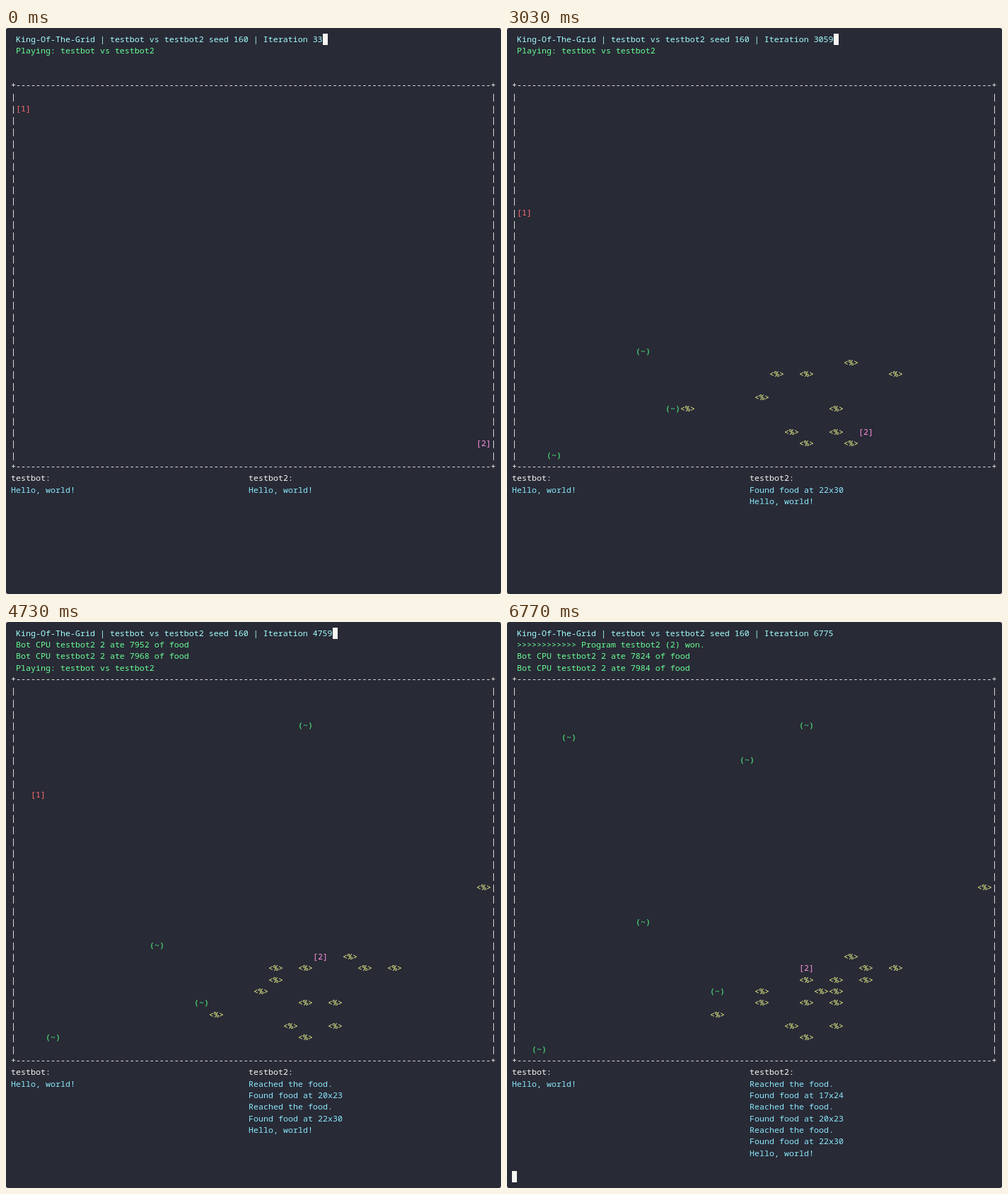
Animation of 700x800 px, one loop 9770 ms. Source, as an HTML page:

```html
<!DOCTYPE html>
<html lang="en">
<head>
<meta charset="utf-8">
<title>Grid battle</title>
<style>
  html, body { margin: 0; width: 100%; height: 100%; overflow: hidden; background: #fff; }
  #term {
    position: relative; width: 700px; height: 800px; overflow: hidden;
    background: #282a36; border-radius: 3px;
    font: 11.6667px/16.3333px "Noto Sans Mono", "DejaVu Sans Mono", monospace;
    font-variant-ligatures: none; font-kerning: none;
  }
  #term span { position: absolute; white-space: pre; }
  #cursor { position: absolute; width: 7px; height: 16px; background: #f8f8f2; }
</style>
</head>
<body>
<div id="term"><div id="frame"></div><div id="live"></div><div id="cursor"></div></div>
<script>
const LOOP = 9770, LAST = 199, CW = 7, LH = 49 / 3;
const C = {
  white: '#f8f8f2', title: '#a4ffff', log: '#69ff94', say: '#8be9fd',
  food: '#f1fa8c', plant: '#50fa7b', bot1: '#ff6e6e', bot2: '#ff92df'
};

// Food in order of growth; one piece sprouts every 8.3 ticks.
const foods = [
  [22, 23], [19, 24], [21, 27], [18, 29], [17, 24], [25, 24], [16, 26], [11, 27],
  [22, 30], [19, 30], [21, 29], [23, 24], [20, 23], [19, 27], [31, 17], [17, 25],
  [13, 28], [20, 26], [23, 25], [16, 27], [19, 25], [21, 25], [21, 26]
].map(([x, y], i) => ({ x, y, born: 8.3 * i + 3.7, gone: Infinity }));

// Key points of each path: tick, x, y.
const creatures = [
  [[20, 9, 26], [80, 10, 26.6], [118, 12, 27], [199, 12.6, 26.4]],
  [[75, 8, 22], [120, 9, 22], [199, 8, 20]],
  [[80, 2, 31], [120, 2, 30], [240, 1, 31]],
  [[105, 19, 3]],
  [[140, 16, 7], [199, 15, 6]],
  [[185, 3, 4]]
];
const bot1 = [[0, 0, 1], [33, 2, 10], [57, 0, 12], [110, 0, 9], [170, 2, 8]];
const bot2 = [
  [0, 31, 30], [33, 27, 31], [63, 27, 31], [92, 23, 29], [98, 22, 30], [107, 22, 28], [116, 20, 28],
  [141, 20, 23], [154, 16, 23], [162, 16, 24], [168, 17, 24], [174, 17, 25], [184, 19, 24]
];

function along(path, n) {
  const i = path.findIndex(p => p[0] > n);
  if (i < 0) return path[path.length - 1].slice(1).map(Math.round);
  const [a, x, y] = path[i - 1], [b, u, v] = path[i];
  const f = (n - a) / (b - a);
  return [Math.round(x + (u - x) * f), Math.round(y + (v - y) * f)];
}

// Whoever steps on food eats it; the second bot reports its meals.
const log = [[0, 'Playing: testbot vs testbot2']];
const speech = [[0, 'Hello, world!']];
const energy = [7968, 7952, 7936, 7984, 7824];
let meals = 0;

function report(n, { x, y }) {
  log.push([n, `Bot CPU testbot2 2 ate ${energy[meals]} of food`]);
  if (meals < 3) speech.push([84 + 39 * meals, `Found food at ${x}x${y}`], [n, 'Reached the food.']);
  meals++;
}

for (let n = 0; n <= LAST; n++) {
  const eaters = [bot2, bot1, ...creatures].filter(p => p[0][0] <= n);
  for (const food of foods) {
    if (n < food.born || n >= food.gone) continue;
    const eater = eaters.find(p => {
      const [x, y] = along(p, n);
      return x === food.x && y === food.y;
    });
    if (!eater) continue;
    food.gone = n;
    if (eater === bot2) report(n, food);
  }
}
log.push([LAST, '>'.repeat(12) + ' Program testbot2 (2) won.']);

const $ = id => document.getElementById(id);
const frame = $('frame'), live = $('live'), cursor = $('cursor');

function put(parent, text, col, row, color, lift = 0) {
  const el = document.createElement('span');
  el.textContent = text;
  el.style.left = 7 + col * CW + 'px';
  el.style.top = 7.8 + row * LH - lift + 'px';
  el.style.color = color;
  parent.append(el);
}

const cell = (text, [x, y], color) => put(live, text, 1 + 3 * x, 5 + y, color);
const newest = (list, n) => list.filter(e => e[0] <= n).map(e => e[1]).reverse();

function drawFrame() {
  for (const row of [4, 37]) put(frame, '+' + '-'.repeat(96) + '+', 0, row, C.white, 1);
  for (let row = 5; row < 37; row++)
    for (const col of [0, 97]) put(frame, '|', col, row, C.white);
  put(frame, 'testbot:', 0, 38, C.white);
  put(frame, 'testbot2:', 48, 38, C.white);
  put(frame, 'Hello, world!', 0, 39, C.say);
}

function draw(n) {
  live.replaceChildren();
  const over = n === LAST;
  const title = 'King-Of-The-Grid | testbot vs testbot2 seed 160 | Iteration ' + (over ? 6775 : 33 + 34 * n);
  put(live, title, 1, 0, C.title);
  newest(log, n).slice(0, 3).forEach((s, i) => put(live, s, 1, 1 + i, C.log));
  newest(speech, n).forEach((s, i) => put(live, s, 48, 39 + i, C.say));

  for (const { x, y, born, gone } of foods)
    if (n >= born && n < gone) cell('<%>', [x, y], C.food);
  for (const path of creatures)
    if (n >= path[0][0]) cell('(~)', along(path, n), C.plant);
  if (!over) cell('[1]', along(bot1, n), C.bot1);
  cell('[2]', along(bot2, n), C.bot2);

  cursor.style.left = 7 + (over ? 0 : 1 + title.length) * CW + 'px';
  cursor.style.top = Math.round(8 + (over ? 47 : 0) * LH) + 'px';
}

let shown = -1;
const start = performance.now();
function tick() {
  const t = (performance.now() - start) % LOOP;
  // a tick lasts 34 ms, snapped to 10 ms
  const n = Math.min(LAST, Math.floor((Math.floor(t / 10) + 0.5) / 3.4));
  if (n !== shown) draw(shown = n);
  requestAnimationFrame(tick);
}
drawFrame();
tick();
</script>
</body>
</html>
```
